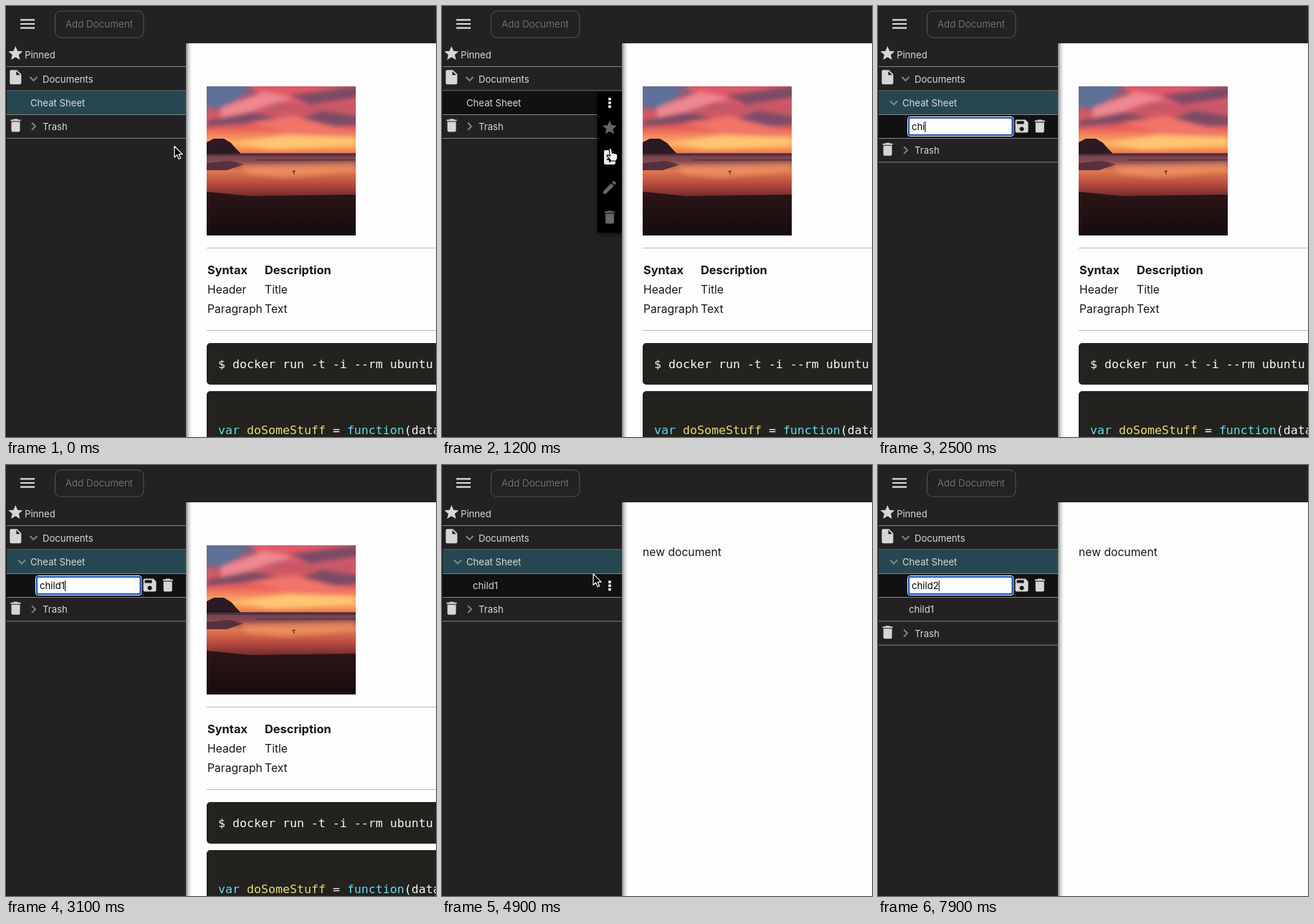
Animation, 600 px wide and 601 px high, one loop 8 s. Source, as an HTML page:

```html
<!DOCTYPE html>
<html lang="en">
<head>
<meta charset="utf-8">
<title>Document tree</title>
<style>
  html, body { margin: 0; width: 100%; height: 100%; overflow: hidden; background: #232123; }
  svg { display: block; }
  text { font: 13.15px Inter, "Liberation Sans", sans-serif; fill: #d8d8d8; white-space: pre; }
  .page text { font-size: 15.7px; fill: #161616; }
  .page .b { font-size: 16.4px; font-weight: 700; }
  .page .code { font: 16.6px "DejaVu Sans Mono", monospace; fill: #f8f8f2; }
  .code .kw { fill: #66d9ef; }
  .code .fn { fill: #e6db74; }
  .line { fill: #858486; }
  .icon { fill: #d6d6d6; }
  .chev { fill: none; stroke: #858585; stroke-width: 2; }
  .dim { fill: #666; }
  .outline { stroke-linejoin: round; stroke-width: 1.2; }
</style>
</head>
<body>
<svg width="600" height="601" viewBox="0 0 600 601">
  <defs>
    <path id="star" d="M12 17.27L18.18 21l-1.64-7.03L22 9.24l-7.19-.61L12 2 9.19 8.63 2 9.24l5.46 4.73L5.82 21z"/>
    <path id="file" d="M6 2c-1.1 0-2 .9-2 2v16c0 1.1.9 2 2 2h12c1.1 0 2-.9 2-2V8l-6-6H6zm7 7V3.5L18.5 9H13z"/>
    <path id="bin" d="M6 19c0 1.1.9 2 2 2h8c1.1 0 2-.9 2-2V7H6v12zM19 4h-3.5l-1-1h-5l-1 1H5v2h14V4z"/>
    <path id="save" d="M17 3H5c-1.1 0-2 .9-2 2v14c0 1.1.9 2 2 2h14c1.1 0 2-.9 2-2V7l-4-4zm-5 16c-1.66 0-3-1.34-3-3s1.34-3 3-3 3 1.34 3 3-1.34 3-3 3zm3-10H5V5h10v4z"/>
    <path id="pen" d="M3 17.25V21h3.75L17.81 9.94l-3.75-3.75L3 17.25zM20.71 7.04c.39-.39.39-1.02 0-1.41l-2.34-2.34c-.39-.39-1.02-.39-1.41 0l-1.83 1.83 3.75 3.75 1.83-1.83z"/>
    <path id="add" d="M14 2H6c-1.1 0-2 .9-2 2v16c0 1.1.9 2 2 2h12c1.1 0 2-.9 2-2V8l-6-6zm2 14h-3v3h-2v-3H8v-2h3v-3h2v3h3v2zm-3-7V3.5L18.5 9H13z"/>
    <path id="dots" fill="#fff" d="M232.2 128h3.6v3.6h-3.6zm0 5.2h3.6v3.6h-3.6zm0 5.2h3.6v3.6h-3.6z"/>
    <path id="down" d="M-5-2.5L0 2.5 5-2.5"/>
    <linearGradient id="shade">
      <stop stop-opacity=".5"/><stop offset=".4" stop-opacity=".2"/><stop offset="1" stop-opacity="0"/>
    </linearGradient>
    <linearGradient id="sky" x2="0" y2="1">
      <stop stop-color="#75607e"/><stop offset=".3" stop-color="#c4566a"/>
      <stop offset=".62" stop-color="#e8605a"/><stop offset=".85" stop-color="#ffb062"/>
      <stop offset="1" stop-color="#e87848"/>
    </linearGradient>
    <linearGradient id="sea" x2="0" y2="1">
      <stop stop-color="#66404f"/><stop offset=".2" stop-color="#8a4a50"/>
      <stop offset=".4" stop-color="#e07850"/><stop offset=".7" stop-color="#b84a40"/>
      <stop offset="1" stop-color="#6a2a2c"/>
    </linearGradient>
    <linearGradient id="sand" x2="0" y2="1">
      <stop stop-color="#2c1517"/><stop offset="1" stop-color="#160c0e"/>
    </linearGradient>
    <filter id="soft"><feGaussianBlur stdDeviation="3"/></filter>
    <filter id="drop" x="-50%" y="-10%" width="200%" height="120%"><feDropShadow dx="0" dy="2" stdDeviation="3" flood-opacity=".7"/></filter>
    <clipPath id="photo"><path d="M280 112h208v208H280z"/></clipPath>
    <clipPath id="side"><path d="M0 52h251v549H0z"/></clipPath>
  </defs>

  <rect width="600" height="601" fill="#232123"/>

  <g class="page">
    <rect x="251" y="52" width="349" height="549" fill="#fefdfe"/>
    <g id="sheet">
      <g clip-path="url(#photo)">
        <rect x="280" y="112" width="208" height="94" fill="url(#sky)"/>
        <g filter="url(#soft)">
          <path fill="#5f7196" d="M276 108h62l-14 22-24 14-24-4z"/>
          <path fill="#e05a68" d="M335 108h160v28l-60 4-70-6z"/>
          <path fill="#ee8790" d="M300 142l60-22 40 8-50 16-50 20z"/>
          <path fill="#7d4c66" d="M395 124l100-14v18l-70 10zM280 160l60-12 40 8-50 8-50 4zM390 166l50-20 55 8v12l-60 4z"/>
          <path fill="#f2756a" d="M340 164l60-10 88 22-90 2z"/>
          <path fill="#ffc574" d="M322 190l70-10 96 4v10l-120 6z"/>
        </g>
        <rect x="280" y="205" width="208" height="62" fill="url(#sea)"/>
        <path fill="#56303d" d="M280 206h208v3H280zM280 219l32-3 20 5-24 8h-28zM350 214h138v1.500H350z"/>
        <path fill="#f59a68" opacity=".6" filter="url(#soft)" d="M325 222l163-4v12l-100 10-50-6z"/>
        <path fill="url(#sand)" d="M280 259l60 6 148-2v57H280z"/>
        <path fill="#2b1923" d="M280 206v-16l10-5h14l10 6 8 9 6 6z"/>
        <path stroke="#32161c" fill="none" d="M399 231l5-1M402 231v4"/>
      </g>
      <path fill="#bbb" d="M280 337h320v1H280zM280 452h320v1H280z"/>
      <text class="b" x="281" y="374">Syntax</text><text class="b" x="361" y="374">Description</text>
      <text x="281" y="401">Header</text><text x="361" y="401">Title</text>
      <text x="281" y="428">Paragraph</text><text x="361" y="428">Text</text>
      <rect x="280" y="470" width="340" height="58" rx="5" fill="#23221e"/>
      <rect x="280" y="537" width="340" height="90" rx="5" fill="#23221e"/>
      <text class="code" x="296" y="505">$ docker run -t -i --rm ubuntu</text>
      <text class="code" x="296" y="597"><tspan class="kw">var</tspan> <tspan class="fn">doSomeStuff</tspan> = <tspan class="kw">function</tspan>(data</text>
    </g>
    <text id="fresh" x="280" y="127">new document</text>
    <rect x="251" y="52" width="8" height="549" fill="url(#shade)"/>
  </g>

  <path fill="#dedede" d="M20 18.350h20v2.200H20zM20 23.900h20v2.200H20zM20 29.450h20v2.200H20z"/>
  <rect x="68.500" y="7" width="123.500" height="37" rx="8" fill="none" stroke="#575557"/>
  <text x="83" y="30" style="font-size:13.5px;font-weight:300;fill:#858385">Add Document</text>

  <g clip-path="url(#side)">
    <use href="#star" class="icon" x="1.300" y="54"/>
    <text x="26" y="73">Pinned</text>
    <rect class="line" y="84" width="251" height="1"/>
    <use href="#file" class="icon" x="1.300" y="87.300"/>
    <use href="#down" class="chev" x="38.500" y="101.500"/>
    <text x="51" y="106.500">Documents</text>
    <rect class="line" y="117.500" width="251" height="1"/>

    <g id="cheat">
      <rect id="cheatBg" y="118.500" width="251" height="33"/>
      <use id="cheatChev" href="#down" class="chev" x="22" y="135"/>
      <text x="34" y="140">Cheat Sheet</text>
      <use id="cheatDots" href="#dots"/>
      <rect class="line" y="151" width="251" height="1"/>
    </g>

    <g id="entry">
      <rect id="entryBg" y="152" width="251" height="32" fill="#111012"/>
      <rect x="43" y="156.500" width="144.500" height="23" fill="#fff" stroke="#777"/>
      <g id="ring" fill="none">
        <rect x="41.500" y="154.500" width="147.500" height="27" rx="3" stroke="#fff"/>
        <rect x="43" y="156" width="144.500" height="24" rx="2" stroke="#1450b4" stroke-width="2"/>
      </g>
      <text id="typed" x="47" y="173"></text>
      <rect id="caret" y="161" width="1" height="15" fill="#000"/>
      <use href="#save" class="icon" x="188.600" y="155.500"/>
      <use href="#bin" class="icon" x="213.800" y="155.500"/>
      <rect class="line" y="184" width="251" height="1"/>
    </g>

    <g id="child">
      <rect id="childBg" y="152" width="251" height="32" fill="#111012"/>
      <text x="43" y="173">child1</text>
      <use id="childDots" href="#dots" y="33.300"/>
      <rect class="line" y="184" width="251" height="1"/>
    </g>

    <g id="trash">
      <use href="#bin" class="icon" x="1.500" y="154.500"/>
      <path class="chev" d="M36 162.800l5 5-5 5"/>
      <text x="51" y="173">Trash</text>
      <rect class="line" y="184" width="251" height="1"/>
    </g>

    <g id="menu">
      <rect x="217" y="120" width="34" height="196" fill="#060606" filter="url(#drop)"/>
      <use href="#dots"/>
      <use id="menuStar" href="#star" x="222" y="157.500"/>
      <use id="menuAdd" href="#add" x="222" y="199"/>
      <use href="#pen" class="dim" x="222" y="241"/>
      <use href="#bin" class="dim" x="222" y="282.500"/>
    </g>
    <rect y="52" width="1" height="549" fill="#141315"/>
  </g>

  <g id="cursor">
    <path id="arrow" class="outline" fill="#000" stroke="#fff" d="M0 0v15.500l3.600-3.400 2.500 5.700 2.600-1.100-2.500-5.500h4.900z"/>
    <path id="hand" class="outline" fill="#fff" stroke="#000" d="M-1.800 1Q0-1 1.400 1l1.300 6 1.500-1.200 1.600 1.400 1.500-.6 1.200 1.400 1.300.5v5l-1.600 4H1L-4.500 11q-.8-2 1.300-1.800L-.5 11z"/>
    <g id="beam" fill="none">
      <path stroke="#fff" stroke-width="3" d="M-3-7q3 0 3 2 0-2 3-2M0-5V5M-3 7q3 0 3-2 0 2 3 2M-2 2.500h4"/>
      <path stroke="#000" d="M-3-7q3 0 3 2 0-2 3-2M0-5V5M-3 7q3 0 3-2 0 2 3 2M-2 2.500h4"/>
    </g>
  </g>
</svg>
<script>
const LOOP = 8000, PITCH = 33.33, KEY = 110;
const $ = id => document.getElementById(id);
const show = (id, on) => $(id).style.display = on ? '' : 'none';
const shift = (id, n) => $(id).setAttribute('transform', `translate(0 ${n * PITCH})`);
const within = (t, a, b) => t >= a && t < b;

// Each round: menu opens, entry row appears, field is clicked, first key, entry is saved
const rounds = [
  { menu: 500, add: 1400, focus: 1900, type: 2200, save: 4100, word: 'child1' },
  { menu: 5150, add: 6200, focus: 7100, type: 7200, save: LOOP, word: 'child2' }
];
const POINTER_BACK = 4400;

// Pointer stops: time, x, y
const path = [
  [100, 235, 195.5], [500, 234, 134], [650, 234, 138], [1150, 235, 198.5], [1400, 235, 198.5],
  [1900, 172.5, 180], [POINTER_BACK, 172.5, 179], [4900, 211, 152], [5150, 234, 134],
  [5400, 234, 142], [6000, 234, 199], [6200, 234, 199], [7050, 172.5, 174], [LOOP, 172.5, 174]
];

function pointer(t) {
  const i = path.findIndex(p => p[0] > t);
  if (!i) return path[0].slice(1);
  const [a, x, y] = path[i - 1], [b, u, v] = path[i];
  const k = (t - a) / (b - a);
  return [x + (u - x) * k, y + (v - y) * k];
}

function draw(t) {
  const [x, y] = pointer(t);
  const round = rounds.find(r => t < r.save);
  const child = t >= rounds[0].save;
  const entry = t >= round.add;
  const menu = within(t, round.menu, round.add);
  const row = Math.floor((y - 118) / PITCH);
  const cheatHover = menu || row === 0;

  show('sheet', !child);
  show('fresh', child);
  $('cheatBg').setAttribute('fill', cheatHover ? '#111012' : '#264751');
  show('cheatChev', entry || child);
  show('cheatDots', cheatHover);

  // Text entry row
  const { word, type, focus } = round;
  const keys = Math.max(0, Math.min(word.length, Math.floor((t - type) / KEY) + 1));
  const lastKey = keys ? type + (keys - 1) * KEY : focus;
  show('entry', entry);
  show('entryBg', row === 1);
  show('ring', t >= focus);
  $('typed').textContent = keys ? word.slice(0, keys) : 'New document...';
  $('typed').style.fill = keys ? '#000' : '#757575';
  $('caret').setAttribute('x', 47 + (keys ? $('typed').getComputedTextLength() : 0));
  show('caret', t >= focus && (t - lastKey) % 1000 < 500);

  const childRow = child && entry ? 2 : 1;
  const childHover = !menu && row === childRow;
  show('child', child);
  shift('child', childRow - 1);
  show('childBg', childHover);
  show('childDots', childHover);
  shift('trash', entry + child);

  show('menu', menu);
  $('menuStar').setAttribute('fill', within(y, 152, 188) ? '#ddd' : '#666');
  $('menuAdd').setAttribute('fill', y >= 188 ? '#e8e8e8' : '#666');

  // Pointer shape depends on what lies below it; it hides while typing
  const beam = entry && row === 1 && x < 189;
  const hand = menu || (cheatHover && x > 224);
  show('cursor', !rounds.some(r => within(t, r.type, r.save)) && !within(t, rounds[0].save, POINTER_BACK));
  $('cursor').setAttribute('transform', `translate(${x} ${y})`);
  show('beam', beam);
  show('hand', hand && !beam);
  show('arrow', !hand && !beam);
}

function tick() {
  draw(performance.now() % LOOP);
  requestAnimationFrame(tick);
}
tick();
</script>
</body>
</html>
```
